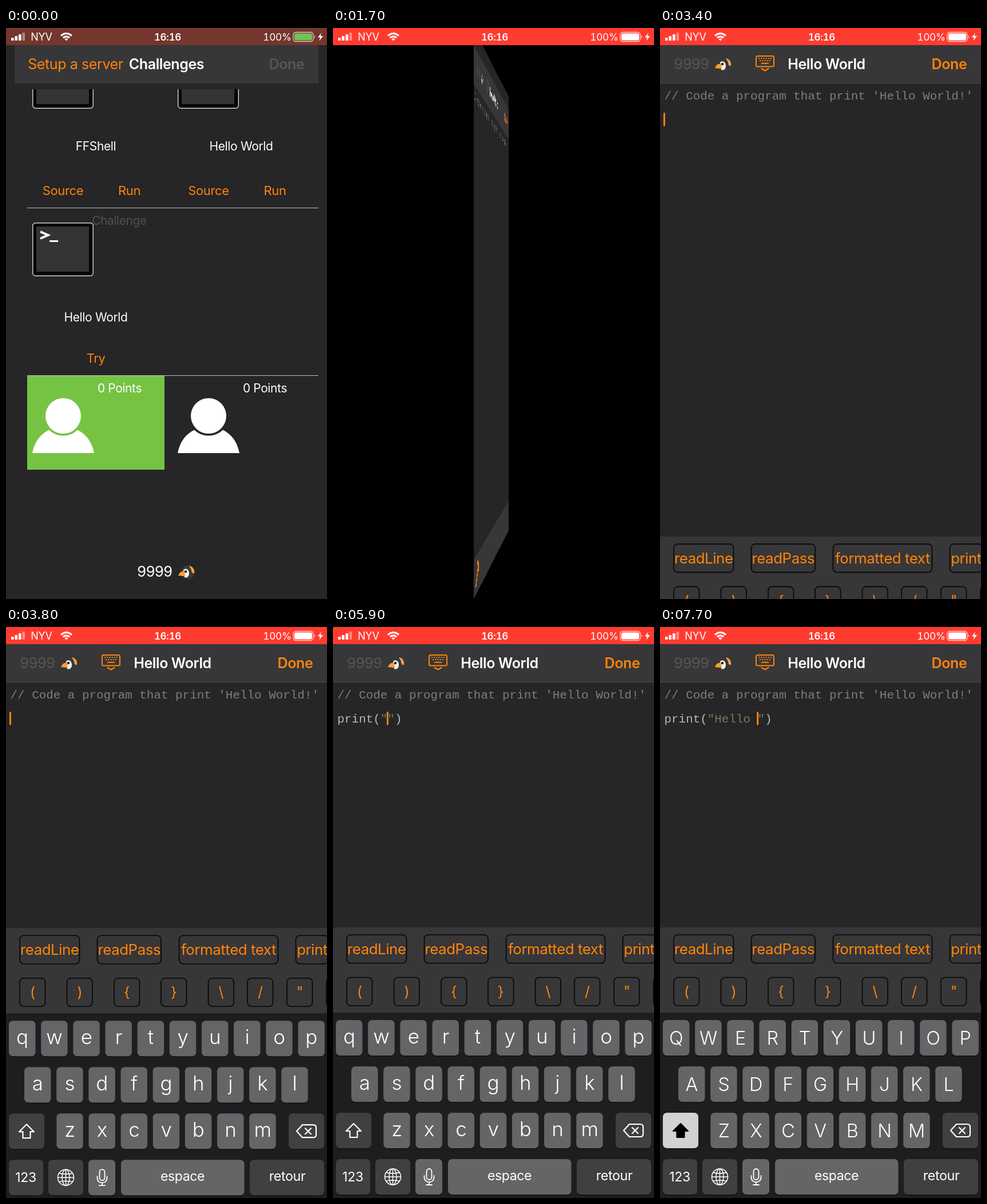
Recreate the animation shown at these times as an HTML page. Size 561 by 998 pixels, loop 8 s.

```html
<!DOCTYPE html>
<html lang="en">
<head>
<meta charset="utf-8">
<title>Coding challenge</title>
<style>
  html, body { margin: 0; width: 100%; height: 100%; overflow: hidden; background: #000; }
  #stage { position: absolute; inset: 0; overflow: hidden; perspective: 1770px; perspective-origin: 280.5px 499px; }
  .page, #status { position: absolute; left: 0; top: 0; width: 561px; height: 998px; }
  .page { transform-origin: 280.5px 499px; }
  svg { display: block; }
  text { font-family: Inter, "Open Sans", sans-serif; letter-spacing: -.016em; white-space: pre; }
  .code { font-family: "Liberation Mono", "DejaVu Sans Mono", monospace; letter-spacing: 0; font-size: 20.92px; }
  .tab { font-variant-numeric: tabular-nums; }
</style>
</head>
<body>
<div id="stage">
  <div class="page" id="list"></div>
  <div class="page" id="editor"></div>
  <div id="status"></div>
</div>
<script>
const LOOP = 8000, STEP = 100;
const BG = '#262527', BAR = '#373638', ORANGE = '#ff8409', LINE = '#4b4a4c', DIM = '#555456';
const $ = id => document.getElementById(id);

// ---- drawing helpers ----
const svg = body => `<svg width="561" height="998" viewBox="0 0 561 998">${body}</svg>`;
const rect = (x, y, w, h, fill, extra = '') =>
  `<rect x="${x}" y="${y}" width="${w}" height="${h}" fill="${fill}" ${extra}/>`;
const label = (s, x, y, size, fill, weight = 400, extra = '') =>
  `<text x="${x}" y="${y}" font-size="${size}" fill="${fill}" font-weight="${weight}" text-anchor="middle" ${extra}>${s}</text>`;
const path = (d, extra) => `<path d="${d}" ${extra}/>`;
const stroke = (color, w) => `fill="none" stroke="${color}" stroke-width="${w}" stroke-linecap="round" stroke-linejoin="round"`;
const at = (x, y, body) => `<g transform="translate(${x} ${y})">${body}</g>`;

const penguin = (x, y) => at(x, y,
  path('M-8 -5C-5 -13 5 -14 11 -8C16 -2 14 9 8 12C2 13 -5 12 -7 6Z', 'fill="#38383c"') +
  path('M5 -11C12 -10 15 -4 14 2C11 3 9 0 9 -4Z', 'fill="#f2a040"') +
  path('M-5 -4C-1 -8 5 -5 5 2C5 8 1 11 -3 9Z', 'fill="#f4f1ec"') +
  path('M-14 6C-12 0 -7 -3 -3 -1L-2 6C-5 8 -10 6 -14 6Z', 'fill="#f6a030"') +
  '<circle cx="-1" cy="-1" r="2.2" fill="#1b1b1d"/>');

const terminal = (x, y) => at(x, y,
  rect(.7, .7, 105.6, 92.6, '#050505', 'rx="5" stroke="#d6d6d6" stroke-width="1.4"') +
  rect(7, 7, 92, 79, '#343335') +
  path('M14 16L27.5 22L14 28', 'fill="none" stroke="#fff" stroke-width="4"') +
  rect(30, 31, 15, 3, '#fff'));

const person = x => at(x, 678,
  '<circle r="31" fill="#fff"/>' +
  path('M-54 65C-50 45 -40 32 -25 24.500A36 36 0 0 0 25 24.500C40 32 50 45 54 65Z', 'fill="#fff"'));

// ---- challenge list ----
const actions = x => label('Source', x, 292, 22, ORANGE) + label('Run', x + 116, 292, 22, ORANGE);
$('list').innerHTML = svg(
  rect(0, 0, 561, 998, BG) + rect(15, 30, 531, 67, BAR) +
  label('Setup a server', 121.5, 72, 25, ORANGE) +
  label('Challenges', 280.5, 72, 25, '#fff', 600) +
  label('Done', 490.5, 72, 25, DIM, 600) +
  '<clipPath id="scroll"><rect y="107" width="561" height="60"/></clipPath>' +
  `<g clip-path="url(#scroll)">${terminal(46, 47) + terminal(300, 47)}</g>` +
  label('FFShell', 157, 214, 21, '#fff') + label('Hello World', 411, 214, 21, '#fff') +
  actions(99.5) + actions(354) +
  rect(37, 314, 509, 1, '#c4c4c4') +
  label('Challenge', 198, 344, 20.8, '#505051') + terminal(46, 340) +
  label('Hello World', 157, 513, 21, '#fff') + label('Try', 157, 585, 21.8, ORANGE) +
  rect(37, 608, 240, 164, '#76c344') + rect(37, 607, 509, 1, '#c4c4c4') +
  [100, 354].map(x => person(x) + label('0 Points', x + 98.5, 637, 20.9, '#fff')).join('') +
  label('9999', 260, 959, 25.4, '#fff') + penguin(315, 951));

// ---- keyboard ----
const key = (x, y, w, fill = '#656466', id = '') =>
  rect(x, y + 1.5, w, 62, '#121113', 'rx="7"') + rect(x, y, w, 62, fill, `rx="7" ${id}`);
const DARK = '#403f41';
const rows = [['qwertyuiop', 5, 687], ['asdfghjkl', 32, 768], ['zxcvbnm', 88.3, 849]];
const eachKey = draw => rows.map(([chars, x, y]) =>
  [...chars].map((c, i) => draw(c, x + 56.15 * i, y)).join('')).join('');

const chip = (s, x, y, w, h, size) =>
  rect(x, y, w, h, 'none', 'rx="7" stroke="#050505" stroke-width="1.6"') +
  label(s, x + w / 2, y + h / 2 + size * .36, size, ORANGE);

const chips =
  [['readLine', 24, 104.5], ['readPass', 159.5, 111.5], ['formatted text', 302.5, 173], ['print', 506.5, 57]]
    .map(([s, x, w]) => chip(s, x, 538, w, 49.500, 25.8)).join('') +
  [['(', 24], [')', 106.5], ['{', 189], ['}', 271], ['\\', 353.5], ['/', 422], ['&quot;', 491], ['', 560]]
    .map(([s, x]) => chip(s, x, 612.5, 44.5, 49.500, 25)).join('');

const globe = at(104.5, 961,
  `<g ${stroke('#fff', 1.5)}><circle r="14"/><ellipse rx="6.5" ry="14"/>` +
  path('M-14 0H14M0 -14V14M-12 -7.500Q0 -4.500 12 -7.500M-12 7.500Q0 4.500 12 7.500', '') + '</g>');
const mic = at(168, 961,
  `<g ${stroke('#fff', 1.8)}><rect x="-4.500" y="-14" width="9" height="19" rx="4.500"/>` +
  path('M-8.500 -2V1C-8.500 12 8.500 12 8.500 1V-2M0 9.500V14M-5 14H5', '') + '</g>');
const erase = at(525, 880,
  `<g ${stroke('#fff', 2.2)}>` +
  path('M-17 0L-7 -11H12Q17 -11 17 -6V6Q17 11 12 11H-7ZM-2 -5L8 5M8 -5L-2 5', '') + '</g>');

const keyboard =
  rect(0, 525, 561, 150, BAR) + chips + rect(0, 674, 561, 330, '#1e1d20') +
  eachKey((c, x, y) => key(x, y, 46.5)) +
  '<g id="lower">' + eachKey((c, x, y) => label(c, x + 23.2, y + 40.5, 35, '#fff', 300)) + '</g>' +
  '<g id="upper">' + eachKey((c, x, y) => label(c.toUpperCase(), x + 23.2, y + 43, 32.5, '#fff', 350)) + '</g>' +
  key(5, 849, 62, DARK, 'id="shift"') +
  path('M36 868L49 881H42.500V892H29.500V881H23Z', 'id="arrow" stroke-width="2.2" stroke-linejoin="round"') +
  key(494, 849, 62, DARK) + erase +
  key(5, 930, 60, DARK) + label('123', 34.5, 969, 23, '#fff') +
  key(74, 930, 61, DARK) + globe + key(144, 930, 47, '#656466') + mic +
  key(201, 930, 215.5) + label('espace', 308.5, 967, 23, '#fff') +
  key(426, 930, 130, DARK) + label('retour', 491.5, 967, 23.3, '#fff');

// ---- editor ----
const dots = [53, 57, 61].map((y, r) => r < 2
  ? path(`M${172 + r * 2} ${y}H${196 - r * 2}`, 'stroke-width="2" stroke-dasharray="2 2.200"')
  : path(`M177 ${y + .8}H190`, 'stroke-width="2"')).join('');
const hammer =
  path('M28 982L50 960', `${stroke(ORANGE, 8.5)}`) +
  path('M41 948C46 941 56 941 61 947C63 950 62 953 65 954L69 957L62 966L58 963C56 961 54 964 52 964L46 958L50 954C50 950 46 947 41 948Z', `fill="${ORANGE}"`);

$('editor').innerHTML = svg(
  rect(0, 0, 561, 998, BG) + rect(0, 30, 561, 67, BAR) + rect(0, 96, 561, 1, LINE) +
  label('9999', 55, 72, 25.4, DIM) + penguin(110, 64) +
  `<g id="hide" fill="none"><rect x="168" y="49" width="31" height="18.500" rx="2.500" stroke-width="2"/>${dots}` +
  path('M177.500 71L183.500 74.500L189.500 71', 'stroke-width="2.200" stroke-linecap="round"') + '</g>' +
  label('Hello World', 291, 72, 25, '#fff', 600) + label('Done', 505.5, 72, 25, ORANGE, 600) +
  `<text class="code" x="7.500" y="124.500" fill="#7e7d80">// Code a program that print 'Hello World!'</text>` +
  '<text class="code" x="7.500" y="166.500" fill="#b9b9bc"><tspan id="open"></tspan><tspan id="str" fill="#64805a"></tspan><tspan id="close"></tspan></text>' +
  rect(0, 148, 3, 23.5, ORANGE, 'id="caret" rx="1"') +
  rect(0, 931, 561, 67, BAR) + rect(0, 931, 561, 1, LINE) + hammer +
  `<g id="keys">${keyboard}</g>`);

// ---- status bar ----
$('status').innerHTML = svg(
  rect(0, 0, 561, 30, '#ff3b30', 'id="strip"') +
  [0, 1, 2, 3].map(i => rect(9 + i * 6.5, 17 - i * 3, 4.6, 5 + i * 3, '#fff', `rx="1" opacity="${i < 3 ? 1 : .4}"`)).join('') +
  label('NYV', 62, 22, 18, '#fff') +
  at(105.5, 21.5, path('M-9.500 -8Q0 -16 9.500 -8M-5.700 -4.300Q0 -9 5.700 -4.300', 'fill="none" stroke="#fff" stroke-width="3"') +
    path('M0 1L-3.200 -2.200Q0 -4.500 3.200 -2.200Z', 'fill="#fff"')) +
  label('16:16', 282.5, 21.5, 17, '#fff', 600, 'class="tab"') +
  label('100%', 474, 22, 17.3, '#fff', 400, 'class="tab"') +
  rect(502, 7.5, 35, 16, 'none', 'rx="4.500" stroke="#fff" stroke-opacity=".75" stroke-width="1.300"') +
  rect(504, 9.5, 31, 12, '#fff', 'id="charge" rx="2.500"') +
  path('M538.800 12.500Q541.500 15.500 538.800 18.500Z', 'fill="#fff" opacity=".75"') +
  path('M551 8.500L545 16.500H549L547.500 22.500L554 14H549.500Z', 'fill="#fff"'));

// ---- timeline ----
const typing = [[6500, 'H'], [6700, 'He'], [6800, 'Hel'], [6900, 'Hell'], [7100, 'Hello'], [7500, 'Hello ']];
const FLIP = 1310, KEYS = 3350, INSERT = 5500;
const clamp = x => Math.min(1, Math.max(0, x));
const easeInOut = x => x < .5 ? 2 * x * x : 1 - 2 * (1 - x) ** 2;
const mix = (a, b, k) => `rgb(${a.map((v, i) => Math.round(v + (b[i] - v) * k))})`;
const show = (id, on) => { $(id).style.display = on ? '' : 'none'; };

function flip(t) {
  const turn = easeInOut(clamp((t - FLIP) / 750));
  const front = turn < .5;
  const angle = front ? -180 * turn : 180 * (1 - turn);
  // recede so that the near edge stays in the screen plane
  const depth = -280.5 * Math.abs(Math.sin(angle * Math.PI / 180));
  show('list', front);
  show('editor', !front);
  $(front ? 'list' : 'editor').style.transform =
    angle ? `translateZ(${depth}px) rotateY(${angle}deg)` : 'none';
}

function draw(t) {
  const red = clamp(t / 300);
  $('strip').setAttribute('fill', mix([116, 54, 45], [255, 59, 48], red));
  $('charge').setAttribute('fill', mix([112, 196, 82], [255, 255, 255], red));
  flip(t);

  const active = t >= 3400;
  $('hide').setAttribute('stroke', active ? ORANGE : DIM);
  const s = Math.max(0, t - KEYS) / 1000 * 18.26;
  show('keys', active);
  $('keys').setAttribute('transform', `translate(0 ${474 * (1 + s) * Math.exp(-s)})`);

  const inserted = t >= INSERT;
  const typed = typing.reduce((text, [when, next]) => t >= when ? next : text, '');
  $('open').textContent = inserted ? 'print(' : '';
  $('str').textContent = inserted ? `"${typed}"` : '';
  $('close').textContent = inserted ? ')' : '';
  $('caret').setAttribute('x', 6 + 12.553 * (inserted ? 7 + typed.length : 0));
  $('caret').setAttribute('opacity', !active ? 0 : t < 4500 || t >= 4800 ? 1 : t < 4600 ? .4 : 0);

  const caps = (t >= 6000 && t < 6500) || t >= 7700;
  show('lower', !caps);
  show('upper', caps);
  $('shift').setAttribute('fill', caps ? '#d2d1d4' : DARK);
  $('arrow').setAttribute('fill', caps ? '#000' : 'none');
  $('arrow').setAttribute('stroke', caps ? '#000' : '#fff');
}

const start = performance.now();
function tick() {
  const t = (performance.now() - start + 4) % LOOP;
  draw(Math.floor(t / STEP) * STEP);
  requestAnimationFrame(tick);
}
tick();
</script>
</body>
</html>
```
